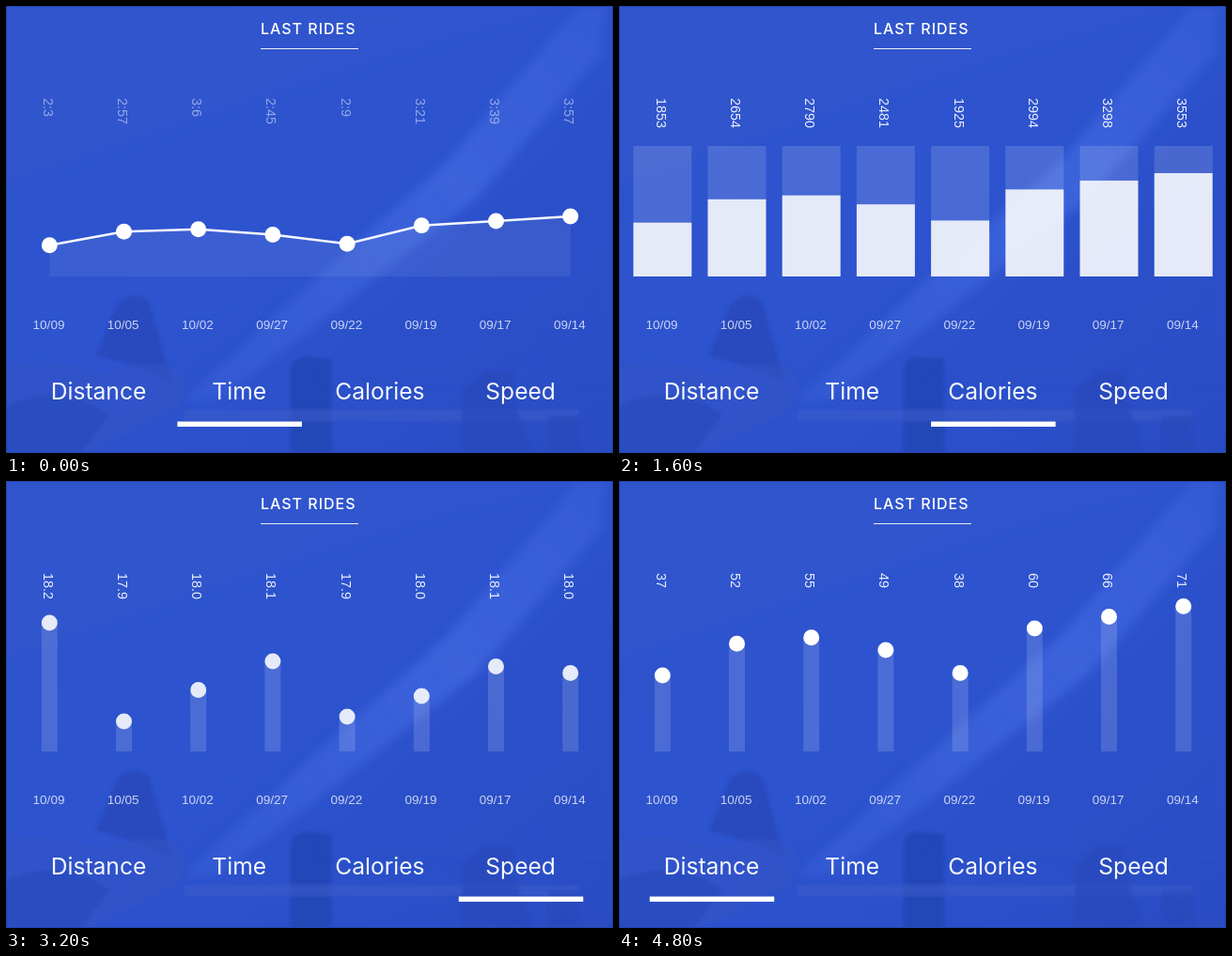
An HTML page with a canvas for the animation above (4.87 s loop, 646 px wide and 476 px high).

```html
<!DOCTYPE html>
<html lang="en">
<head>
<meta charset="utf-8">
<title>Last rides</title>
<style>
  html, body { margin: 0; width: 100%; height: 100%; overflow: hidden; background: #2c52ca; }
  svg, canvas { position: absolute; left: 0; top: 0; }
</style>
</head>
<body>
<svg width="646" height="476" viewBox="0 0 646 476">
  <defs>
    <linearGradient id="base" x2="1" y2="1">
      <stop offset="0" stop-color="#2d53cb"/>
      <stop offset=".5" stop-color="#2d53cf"/>
      <stop offset="1" stop-color="#294cc3"/>
    </linearGradient>
    <linearGradient id="beam" x1="1" y1="0" x2="0" y2="1">
      <stop offset="0" stop-color="#4068df" stop-opacity=".35"/>
      <stop offset=".4" stop-color="#4068df" stop-opacity=".75"/>
      <stop offset="1" stop-color="#4068df" stop-opacity=".3"/>
    </linearGradient>
    <filter id="soft"><feGaussianBlur stdDeviation="5"/></filter>
    <filter id="edge"><feGaussianBlur stdDeviation="1.5"/></filter>
  </defs>
  <rect width="646" height="476" fill="url(#base)"/>
  <g filter="url(#soft)">
    <path d="M0 190L430 45L600 0H0Z" fill="#3458cf" opacity=".45"/>
    <path d="M610 0H636L634 50L500 205L330 340L225 420H190L330 290L470 165Z" fill="url(#beam)"/>
    <path d="M646 60L520 220L330 400H646Z" fill="#2a4fc8" opacity=".5"/>
  </g>
  <g filter="url(#edge)">
    <path d="M96 372L118 318Q135 302 152 314L176 400L140 385Z" fill="#2749b9" opacity=".75"/>
    <path d="M0 382Q60 372 100 392Q150 372 185 388Q200 410 180 432L90 476H0Z" fill="#3556c4" opacity=".45"/>
    <path d="M0 425Q60 400 110 435L80 476H0Z" fill="#2648b8" opacity=".5"/>
    <path d="M303 476V385Q307 372 322 374L346 376V476Z" fill="#2446b3" opacity=".8"/>
    <path d="M190 430H610V442H190Z" fill="#3c5fcb" opacity=".5"/>
    <path d="M485 476V410L510 388H540V420L560 476ZM578 476V436H610V476Z" fill="#2548b9" opacity=".55"/>
  </g>
  <rect x=".5" y=".5" width="645" height="475" fill="none" stroke="#2445ad"/>
</svg>
<canvas id="stage" width="646" height="476"></canvas>
<script>
const ctx = document.getElementById('stage').getContext('2d');
const LOOP = 4870, GROW = 500, BASE = 288;
const dates = ['10/09', '10/05', '10/02', '09/27', '09/22', '09/19', '09/17', '09/14'];
const minutes = [123, 177, 186, 165, 129, 201, 219, 237];
const speeds = [18.2, 17.9, 18, 18.1, 17.9, 18, 18.1, 18];
const calories = [1853, 2654, 2790, 2481, 1925, 2994, 3298, 3553];
const distances = minutes.map((m, i) => m * speeds[i] / 60);
const tabs = ['Distance', 'Time', 'Calories', 'Speed'];

const charts = [
  { tab: 1, start: -259, draw: drawLine, heights: minutes.map(m => m / 2),
    labels: minutes.map(m => Math.floor(m / 60) + ':' + m % 60) },
  { tab: 2, start: 925, draw: drawBars, heights: calories.map(c => c * .03096), labels: calories },
  { tab: 3, start: 2335, draw: (h, p) => drawPins(h, .88),
    heights: [137, 32, 65.5, 96, 37, 59, 90.5, 83.5], labels: speeds.map(s => s.toFixed(1)) },
  { tab: 0, start: 3462, draw: (h, p) => drawPins(h, 1),
    heights: distances.map(d => d * 2.172), labels: distances.map(Math.floor) }
];

const colX = i => 46.3 + 79.2 * i;
const white = a => `rgba(255,255,255,${a})`;
const easeInOut = t => t < .5 ? 2 * t * t : 1 - 2 * (1 - t) ** 2;

function rect(x, y, w, h, alpha) {
  ctx.fillStyle = white(alpha);
  ctx.fillRect(x, y, w, h);
}

function text(str, x, y, font, alpha, align = 'center') {
  ctx.font = font;
  ctx.fillStyle = white(alpha);
  ctx.textAlign = align;
  ctx.fillText(str, x, y);
}

function dot(x, y, alpha) {
  ctx.fillStyle = white(alpha);
  ctx.beginPath();
  ctx.arc(x, y, 8.5, 0, 7);
  ctx.fill();
}

function drawLine(heights, p) {
  const line = new Path2D();
  heights.forEach((h, i) => line.lineTo(colX(i), BASE - h));
  const area = new Path2D(line);
  area.lineTo(colX(7), BASE);
  area.lineTo(colX(0), BASE);
  ctx.fillStyle = white(.13 * p);
  ctx.fill(area);
  ctx.strokeStyle = white(.95);
  ctx.lineWidth = 2.5;
  ctx.stroke(line);
  heights.forEach((h, i) => dot(colX(i), BASE - h, 1));
}

function drawBars(heights, p) {
  heights.forEach((h, i) => {
    const x = colX(i) - 31;
    rect(x, 149, 62, BASE - h - 149, .14 * p);
    rect(x, BASE - h, 62, h, .88);
  });
}

function drawPins(heights, alpha) {
  heights.forEach((h, i) => {
    const x = colX(i), y = BASE - h;
    rect(x - 8.5, y, 17, h, .15);
    // Clear the stem behind the translucent head
    ctx.globalCompositeOperation = 'destination-out';
    dot(x, y, 1);
    ctx.globalCompositeOperation = 'source-over';
    dot(x, y, alpha);
  });
}

function render(now) {
  const t = now % LOOP;
  const chart = charts.findLast(c => t >= c.start);
  const p = easeInOut(Math.min(1, (t - chart.start) / GROW));
  ctx.clearRect(0, 0, 646, 476);

  ctx.letterSpacing = '1px';
  text('LAST RIDES', 271, 30, '500 16px Inter, sans-serif', 1, 'left');
  ctx.letterSpacing = '0px';
  rect(271, 45, 104, 1, .9);

  chart.draw(chart.heights.map(h => h * p), p);
  dates.forEach((date, i) => {
    text(date, colX(i) - .8, 343.5, '13.5px "Liberation Sans", sans-serif', .75);
    ctx.save();
    ctx.translate(colX(i) - 6.5, 98);
    ctx.rotate(Math.PI / 2);
    text(chart.labels[i], 0, 0, '14.4px "Liberation Sans", sans-serif', .9 * p, 'left');
    ctx.restore();
  });

  tabs.forEach((tab, i) => text(tab, 98.5 + 149.7 * i, 419, '24.6px Inter, sans-serif', .96));
  rect(32.7 + 149.7 * chart.tab, 442.5, 132.5, 5.5, 1);
  requestAnimationFrame(render);
}
requestAnimationFrame(render);
</script>
</body>
</html>
```
